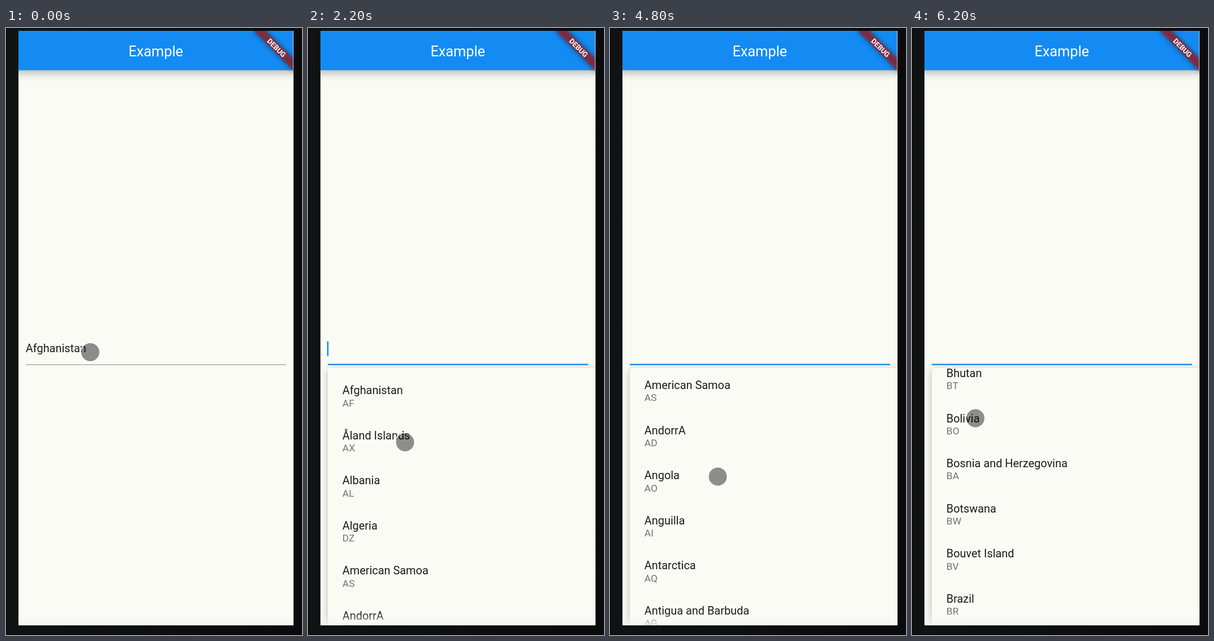
Write an HTML page with a canvas that moves like this. It is 523 px wide and 1071 px high and loops after 6400 ms.

```html
<!DOCTYPE html>
<html lang="en">
<head>
<meta charset="utf-8">
<title>Country field</title>
<style>
html, body { margin: 0; width: 100%; height: 100%; overflow: hidden; background: #111113; }
canvas { display: block; }
</style>
</head>
<body>
<canvas width="523" height="1071"></canvas>
<script>
const ctx = document.querySelector('canvas').getContext('2d');
const LOOP = 6400, STEP = 200, U = 1.244;
const BLUE = '#148bf3', PAPER = '#fafbf5', INK = '#1b1b1b';
const LEFT = 22, TOP = 5, RIGHT = 508, BOTTOM = 1054, BAR = 74.5;
const CARD_X = 35, CARD_Y = 600, LOADER_H = 82.5, LIST_H = 470, ROW = 79.55;

const countries = ('Afghanistan,AF|Åland Islands,AX|Albania,AL|Algeria,DZ|American Samoa,AS|AndorrA,AD|' +
  'Angola,AO|Anguilla,AI|Antarctica,AQ|Antigua and Barbuda,AG|Argentina,AR|Armenia,AM|Aruba,AW|' +
  'Australia,AU|Austria,AT|Azerbaijan,AZ|Bahamas,BS|Bahrain,BH|Bangladesh,BD|Barbados,BB|' +
  'Belarus,BY|Belgium,BE|Belize,BZ|Benin,BJ|Bermuda,BM|Bhutan,BT|Bolivia,BO|' +
  'Bosnia and Herzegovina,BA|Botswana,BW|Bouvet Island,BV|Brazil,BR').split('|').map(s => s.split(','));

// [time, scroll offset]
const scrollKeys = [[4400, 0], [4600, 150], [4800, 327.4], [5000, 500], [5200, 880],
  [5400, 1230], [5600, 1545], [5800, 1900], [6000, 2019]];
// [time, x, y]
const pointerKeys = [[400, 149, 572], [1800, 150, 690], [2200, 171.5, 731], [3200, 171.5, 731],
  [4200, 185, 900], [4400, 188, 880], [4600, 192, 730], [4800, 190.5, 791.5], [5000, 194, 640],
  [5200, 196, 610], [5400, 188, 790], [5600, 196.5, 653], [5800, 172, 690], [6000, 141, 764],
  [6200, 112, 688.5]];

const clamp = v => Math.min(1, Math.max(0, v));

function sample(keys, t, col) {
  let prev = keys[0];
  for (const key of keys) {
    if (t <= key[0]) {
      const k = key === prev ? 1 : clamp((t - prev[0]) / (key[0] - prev[0]));
      return prev[col] + (key[col] - prev[col]) * k;
    }
    prev = key;
  }
  return prev[col];
}

// cubic-bezier(.4, 0, .2, 1)
function ease(x) {
  if (x <= 0 || x >= 1) return clamp(x);
  let lo = 0, hi = 1, s;
  for (let i = 0; i < 24; i++) {
    s = (lo + hi) / 2;
    if (1.2 * s * (1 - s) ** 2 + 0.6 * s * s * (1 - s) + s ** 3 < x) lo = s; else hi = s;
  }
  return 3 * s * s - 2 * s ** 3;
}

function rect(x, y, w, h, color) {
  ctx.fillStyle = color;
  ctx.fillRect(x, y, w, h);
}

function text(str, x, y, size, color, align = 'left', weight = 400) {
  ctx.font = `${weight} ${size}px Roboto, sans-serif`;
  ctx.textAlign = align;
  ctx.fillStyle = color;
  ctx.fillText(str, x, y);
}

function setShadow(alpha, blur, dy) {
  ctx.shadowColor = `rgba(0,0,0,${alpha})`;
  ctx.shadowBlur = blur;
  ctx.shadowOffsetY = dy;
}

function clipTo(x, y, w, h) {
  ctx.save();
  ctx.beginPath();
  ctx.rect(x, y, w, h);
  ctx.clip();
}

function drawBar() {
  ctx.save();
  setShadow(0.28, 14, 4);
  rect(LEFT - 20, TOP - 20, RIGHT - LEFT + 40, BAR - TOP + 20, BLUE);
  ctx.restore();
  text('Example', 264.7, 49.6, 25.3, '#fff', 'center');
}

function drawBanner() {
  ctx.save();
  ctx.translate(RIGHT, TOP);
  ctx.rotate(Math.PI / 4);
  ctx.scale(U, U);
  ctx.filter = 'blur(4.9px)';
  rect(-40, 28, 80, 12, 'rgba(0,0,0,.5)');
  ctx.filter = 'none';
  rect(-40, 28, 80, 12, 'rgba(183,28,28,.627)');
  text('DEBUG', 0, 37.7, 10.2, '#fff', 'center', 700);
  ctx.restore();
  rect(RIGHT - 0.7, TOP, 0.7, BAR - TOP, PAPER);
}

// Number of characters removed by a held backspace key
function erased(t, start) {
  return t < start ? 0 : 1 + Math.max(0, Math.floor((t - start - 350) / 40));
}

function drawField(t) {
  const second = t >= 2400;
  const word = countries[second ? 1 : 0][0];
  const count = erased(t, second ? 3150 : 300);
  const shown = word.slice(0, Math.max(0, word.length - count));
  text(shown, 34.8, 571.8, 19.9, INK);
  if (t < 50) {
    rect(35, 593.4, 460, 1.4, '#a9a9a7');
    return;
  }
  rect(35, 592.5, 460, 2.5, '#218fee');
  const typing = count > 0 && shown;
  const beat = t < 4100 ? (t - 50) / 500 : (t - 4100) / 700;
  if (typing || Math.floor(beat) % 2 === 0) {
    const lift = shown ? 2 : 0;
    rect(33.7 + ctx.measureText(shown).width, 553 - lift, 2.5, 26, BLUE);
  }
}

function drawCard(h) {
  ctx.save();
  setShadow(0.27, 13, 3);
  ctx.fillStyle = PAPER;
  ctx.beginPath();
  ctx.roundRect(CARD_X, CARD_Y, 500, h, 5);
  ctx.fill();
  ctx.restore();
}

function drawLoader(age) {
  drawCard(LOADER_H);
  const turn = Math.PI * 2;
  const phase = age % 1333 / 1333;
  const head = ease(phase * 2), tail = ease(phase * 2 - 1);
  const start = turn * (-0.25 + 0.75 * tail + age / 2222 + 0.25 * phase);
  ctx.beginPath();
  ctx.arc(279.8, 641.3, 22.4, start, start + Math.max(turn * 0.75 * (head - tail), 0.001));
  ctx.lineWidth = 4 * U;
  ctx.lineCap = 'square';
  ctx.strokeStyle = BLUE;
  ctx.stroke();
}

function drawList(age, scroll) {
  const h = LIST_H * (0.25 + 0.75 * ease(age / 500));
  drawCard(h);
  clipTo(CARD_X, CARD_Y, 500, h);
  countries.forEach(([name, code], i) => {
    const y = 646.2 + i * ROW - scroll;
    if (y < CARD_Y - 40 || y > BOTTOM + 20) return;
    text(name, 60.8, y, 19.9, INK);
    text(code, 60.8, y + 21.4, 17.4, '#737371');
  });
  ctx.restore();
}

function drawPointer(t) {
  if (t >= 400 && t < 1800 || t >= 3200 && t < 4200) return;
  const x = sample(pointerKeys, t, 1), y = sample(pointerKeys, t, 2);
  ctx.beginPath();
  ctx.arc(x, y, 17, 0, 7);
  ctx.lineWidth = 2;
  ctx.strokeStyle = 'rgba(255,255,255,.85)';
  ctx.stroke();
  ctx.beginPath();
  ctx.arc(x, y, 16, 0, 7);
  ctx.fillStyle = 'rgba(0,0,0,.44)';
  ctx.fill();
}

function draw(t) {
  const frame = ctx.createLinearGradient(0, 0, 523, 0);
  frame.addColorStop(0, '#111214');
  frame.addColorStop(1, '#0b0b0d');
  rect(0, 0, 523, 1071, frame);
  rect(0, 0, 1, 1071, '#000');
  rect(0, 1070, 523, 1, '#000');

  clipTo(LEFT, TOP, RIGHT - LEFT, BOTTOM - TOP);
  rect(LEFT, TOP, RIGHT - LEFT, BOTTOM - TOP, PAPER);
  drawBar();
  if (t >= 4100) drawList(t - 4100, sample(scrollKeys, t, 1));
  else if (t >= 2482) drawLoader(t - 2482);
  else if (t >= 1500 && t < 2400) drawList(t - 1500, 0);
  else if (t >= 50 && t < 1500) drawLoader(t - 50);
  drawField(t);
  const haze = ctx.createLinearGradient(0, 1032, 0, BOTTOM);
  haze.addColorStop(0, 'rgba(245,246,247,0)');
  haze.addColorStop(1, 'rgba(245,246,247,.75)');
  rect(LEFT, 1032, RIGHT - LEFT, BOTTOM - 1032, haze);
  drawBanner();
  drawPointer(t);
  ctx.restore();
}

function tick() {
  draw(Math.floor(performance.now() % LOOP / STEP) * STEP);
  requestAnimationFrame(tick);
}
tick();
</script>
</body>
</html>
```
